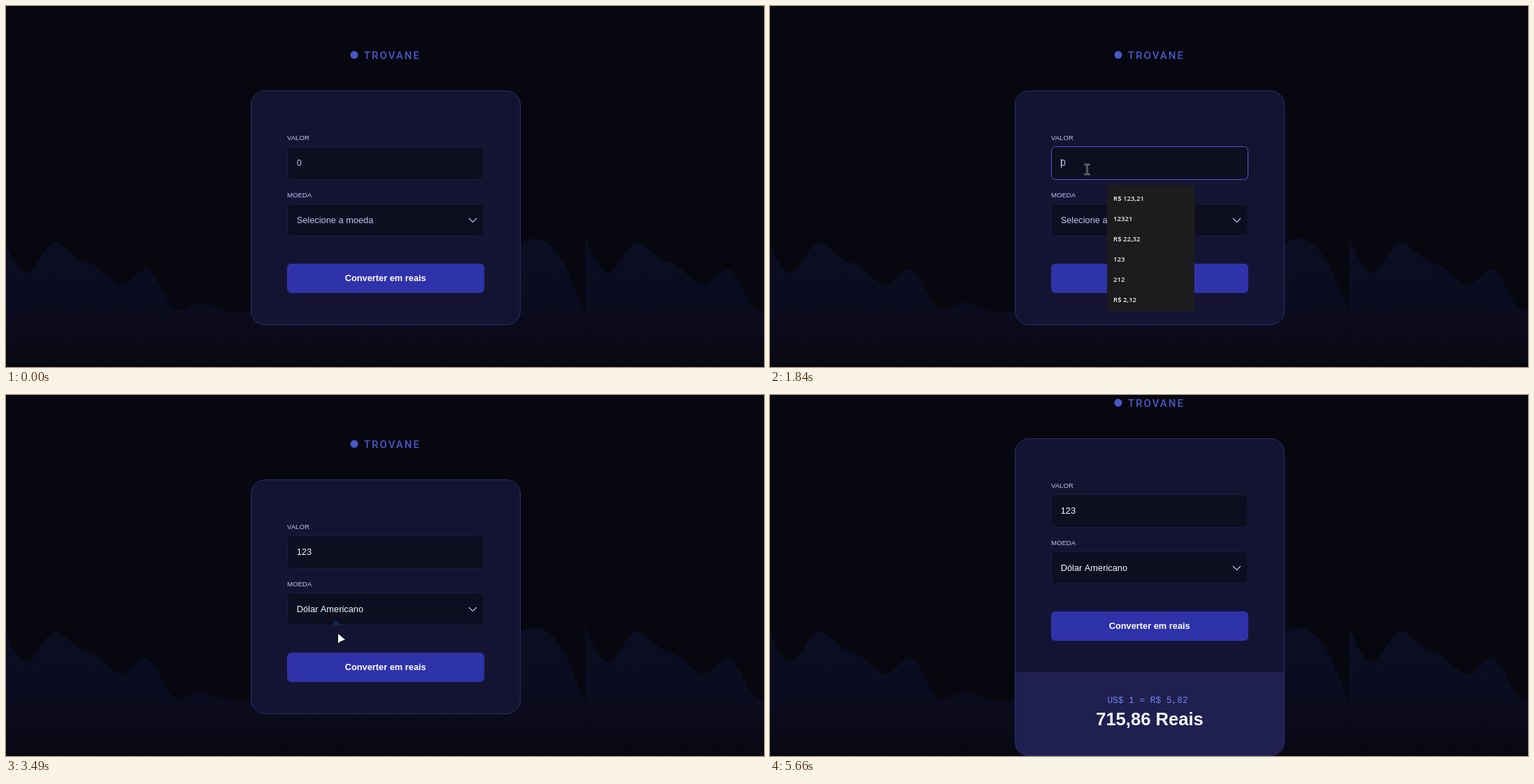
Animation, 1084 px wide and 517 px high, one loop 5730 ms. Source, as an HTML page with a canvas:

```html
<!DOCTYPE html>
<html lang="pt-BR">
<head>
<meta charset="utf-8">
<title>Moeda em reais</title>
<style>
html, body { margin: 0; width: 100%; height: 100%; overflow: hidden; background: #070710; }
canvas { display: block; width: 1084px; height: 517px; }
</style>
</head>
<body>
<canvas id="stage" width="1084" height="517"></canvas>
<script>
const ctx = document.getElementById('stage').getContext('2d');
const W = 1084, H = 517, LOOP = 5730;
const SANS = '"Liberation Sans", Arial, sans-serif';
const MONO = '"Liberation Mono", monospace';
const LILAC = '#c0c0f5', FIELD = '#0d0e20';

// Times of the interface events
const T = {
  enter: 160, focus: 770, type: [1870, 2100, 2360], open: 2750, released: 2850,
  option: 3430, chosen: 3490, press: 4100, result: 4200, leave: 4680, gone: 5080, blur: 5660
};
const SHIFT = -59;

const clamp = v => Math.max(0, Math.min(1, v));
const progress = (t, a, b) => clamp((t - a) / (b - a));
const within = (t, a, b) => t >= a && t < b;
const easeOut = p => 1 - (1 - p) ** 3;
const easeIn = p => p * p;
const smooth = p => p * p * (3 - 2 * p);

// Pointer moves: start, end, from, to, easing
const MOVES = [
  [160, 550, [930, 488], [455, 244], easeOut],
  [550, 670, [455, 244], [453.5, 234], smooth],
  [2390, 2730, [453.5, 234], [465, 315], smooth],
  [3080, 3400, [465, 315], [474, 341], smooth],
  [3720, 4070, [474, 341], [502, 381], smooth],
  [4680, 5080, [502, 381], [1008, 522], easeIn]
];

function pointerAt(t) {
  let pos = MOVES[0][2];
  for (const [a, b, from, to, ease] of MOVES) {
    if (t < a) break;
    const p = ease(progress(t, a, b));
    pos = from.map((v, i) => v + (to[i] - v) * p);
  }
  return pos;
}

function text(str, x, y, size, color, { font = SANS, weight = 400, align = 'left', gap = 0 } = {}) {
  ctx.font = `${weight} ${size}px ${font}`;
  ctx.textAlign = align;
  ctx.letterSpacing = gap + 'px';
  ctx.fillStyle = color;
  ctx.fillText(str, x, y);
}

function box(x, y, w, h, r, fill, stroke) {
  ctx.beginPath();
  ctx.roundRect(x, y, w, h, r);
  if (fill) { ctx.fillStyle = fill; ctx.fill(); }
  if (stroke) { ctx.strokeStyle = stroke; ctx.lineWidth = 1; ctx.stroke(); }
}

function poly(points, fill) {
  ctx.beginPath();
  points.forEach(([x, y]) => ctx.lineTo(x, y));
  ctx.closePath();
  ctx.fillStyle = fill;
  ctx.fill();
}

function circle(x, y, r, fill) {
  ctx.beginPath();
  ctx.arc(x, y, r, 0, Math.PI * 2);
  ctx.fillStyle = fill;
  ctx.fill();
}

const WAVE = [
  [0, 330], [14, 363], [33, 382], [74, 339], [109, 363], [134, 374], [154, 392], [169, 400],
  [204, 377], [249, 436], [283, 425], [304, 432], [334, 439], [450, 420], [600, 400],
  [740, 339], [761, 333], [784, 344], [804, 373], [819, 409], [831, 438]
];

// Slope at a point: flat at peaks and troughs, averaged elsewhere
function slope(i) {
  const [a, b, c] = [WAVE[i - 1], WAVE[i], WAVE[i + 1]];
  const s = (p, q) => (q[1] - p[1]) / (q[0] - p[0]);
  if (!a) return s(b, c);
  if (!c) return s(a, b);
  const l = s(a, b), r = s(b, c);
  return l * r <= 0 ? 0 : (l + r) / 2;
}

function drawWaves() {
  const fill = ctx.createLinearGradient(0, 330, 0, H);
  fill.addColorStop(0, '#0d0d22');
  fill.addColorStop(0.5, '#0c0c20');
  fill.addColorStop(1, '#080813');
  for (const left of [-4, 828]) {
    ctx.beginPath();
    ctx.moveTo(left, H);
    ctx.lineTo(left, WAVE[0][1]);
    for (let i = 1; i < WAVE.length; i++) {
      const [x0, y0] = WAVE[i - 1], [x1, y1] = WAVE[i], d = (x1 - x0) / 3;
      ctx.bezierCurveTo(left + x0 + d, y0 + slope(i - 1) * d,
        left + x1 - d, y1 - slope(i) * d, left + x1, y1);
    }
    ctx.lineTo(left + 831, H);
    ctx.fillStyle = fill;
    ctx.fill();
  }
}

function drawCard(done) {
  circle(498, 70, 5.5, '#4858cb');
  text('TROVANE', 512, 75.5, 15, '#4858cb', { font: 'Roboto, sans-serif', weight: 500, gap: 2 });

  const height = done ? 454 : 335;
  box(350.5, 121.5, 385, height, 20, '#141432');
  if (done) box(350.5, 455.5, 385, 120, [0, 0, 20, 20], '#1f2050');
  box(350.5, 121.5, 385, height, 20, null, '#2b2d73');
  if (done) {
    text('US$ 1 = R$ 5,82', 540, 500, 12.8, '#7385ee', { font: MONO, align: 'center' });
    text('715,86 Reais', 543, 532, 25.6, '#f4f4fc', { weight: 700, align: 'center' });
  }
}

function drawFields(t) {
  const typed = T.type.filter(at => t >= at).length;
  const value = '123'.slice(0, typed);
  const focused = within(t, T.focus, T.open);
  text('VALOR', 402, 192, 9.6, LILAC);
  box(402.5, 201.5, 281, 47, 6, FIELD, focused ? '#4a5bd4' : '#1b1c40');
  text(value || '0', 415.7, 229, 12.8, value ? '#f8f8ff' : LILAC);
  if (focused && !within(t, 1330, 1840)) {
    ctx.fillStyle = '#d4d4e0';
    ctx.fillRect(416 + Math.round(typed * 7.12), 219, 1, 13);
  }

  const active = within(t, T.open, T.chosen);
  const chosen = t >= T.chosen;
  text('MOEDA', 402, 274, 9.6, LILAC);
  box(402.5, 283.5, 281, 46, 6, FIELD, active ? '#4a5bd4' : '#1b1c40');
  text(chosen ? 'Dólar Americano' : 'Selecione a moeda', 415.7, 311, 12.8, chosen ? '#f8f8ff' : LILAC);
  ctx.beginPath();
  ctx.moveTo(662, 304);
  ctx.lineTo(667.5, 309.5);
  ctx.lineTo(673, 304);
  ctx.strokeStyle = '#c8c8f4';
  ctx.lineWidth = 1.1;
  ctx.stroke();
  if (within(t, T.chosen, T.result)) {
    poly([[467, 329], [469, 324], [472, 323], [475, 326], [481, 329]], '#102650');
  }
}

function drawButton(t) {
  const hover = t < T.result ? progress(t, 3980, 4100) : 1 - progress(t, T.result, 4380);
  const mix = (a, b) => Math.round(a + (b - a) * hover);
  const fill = `rgb(${mix(46, 74)},${mix(51, 93)},${mix(170, 207)})`;
  box(402, 369, 282, 42, 6, fill);
  if (within(t, T.press, T.blur)) box(401.5, 368.5, 283, 43, 7, fill, '#5965b8');
  text('Converter em reais', 542.7, 394, 12.8, '#ffffff', { weight: 700, align: 'center' });
}

function drawHints(t) {
  if (!within(t, T.focus, T.open)) return;
  let rows = ['R$ 123,21', '12321', 'R$ 22,32', '123', '212', 'R$ 2,12'];
  if (t >= T.type[0]) {
    rows = ['R$ 123,21', '12321', '123', '212', 'R$ 2,12', t < T.type[1] ? 'R$ 1,23' : 'R$ 3,12'];
  }
  if (t >= T.type[2]) rows = rows.slice(0, 3);
  ctx.globalAlpha = clamp(0.4 + (t - T.focus) / 100);
  poly([[492, 258], [498, 253], [504, 258]], '#1c1c1e');
  box(482, 257, 125, 6 + rows.length * 29, 2, '#1c1c1e');
  rows.forEach((row, i) => text(row, 491, 279 + i * 29, 9.6, '#eeeef2',
    { font: '"Open Sans", sans-serif', weight: 600 }));
  ctx.globalAlpha = 1;
}

function drawOptions(t, py) {
  if (!within(t, T.open, T.chosen)) return;
  box(402.5, 330.5, 281, 64, 0, FIELD, '#8d8d98');
  const lit = py > 331;
  if (lit) box(403, 331, 280, 21, 0, '#1967d2');
  ['Dólar Americano', 'Euro', 'Libra Esterlina'].forEach((name, i) =>
    text(name, 415.7, 346 + i * 21, 12.8, lit && !i ? '#ffffff' : LILAC));
}

const CURSORS = {
  arrow() {
    ctx.beginPath();
    [[1, 1], [1, 14.5], [5, 11.5], [11, 9.5]].forEach(p => ctx.lineTo(...p));
    ctx.closePath();
    outline();
  },
  hand() {
    ctx.beginPath();
    ctx.roundRect(-2, -0.5, 3.6, 11, 1.8);
    ctx.roundRect(-4, 5.5, 10.5, 8.5, 3);
    outline();
  },
  beam() {
    ctx.beginPath();
    [[-4, -7, 4, -7], [0, -7, 0, 7], [-4, 7, 4, 7]].forEach(([a, b, c, d]) => {
      ctx.moveTo(a, b);
      ctx.lineTo(c, d);
    });
    ctx.strokeStyle = '#8c8c90';
    ctx.lineWidth = 2.4;
    ctx.stroke();
    ctx.strokeStyle = '#29292e';
    ctx.lineWidth = 0.8;
    ctx.stroke();
  }
};

function outline() {
  ctx.lineJoin = 'round';
  ctx.strokeStyle = '#101014';
  ctx.lineWidth = 2.4;
  ctx.stroke();
  ctx.fillStyle = '#ffffff';
  ctx.fill();
}

function cursorKind(t, x, y) {
  if (t >= T.result || x < 402 || x > 684) return 'arrow';
  if (y > 201 && y < 249) return 'beam';
  return (y > 283 && y < 330) || (y > 369 && y < 411) ? 'hand' : 'arrow';
}

function drawPointer(t, x, y) {
  if (!within(t, T.enter, T.gone)) return;
  ctx.save();
  ctx.translate(x, y);
  CURSORS[cursorKind(t, x, y)]();
  ctx.restore();
  const pressed = within(t, T.open, T.released) || within(t, T.option, T.chosen) || within(t, T.press, T.result);
  if (pressed) circle(x, y, 10, 'rgba(240,228,10,0.53)');
}

function draw(t) {
  const done = t >= T.result;
  const [x, y] = pointerAt(t);
  ctx.fillStyle = '#070710';
  ctx.fillRect(0, 0, W, H);
  drawWaves();
  ctx.save();
  if (done) ctx.translate(0, SHIFT);
  drawCard(done);
  drawFields(t);
  drawButton(t);
  ctx.restore();
  drawHints(t);
  drawOptions(t, y);
  drawPointer(t, x, y);
}

const start = performance.now();
function frame() {
  draw((performance.now() - start) % LOOP);
  requestAnimationFrame(frame);
}
frame();
</script>
</body>
</html>
```
